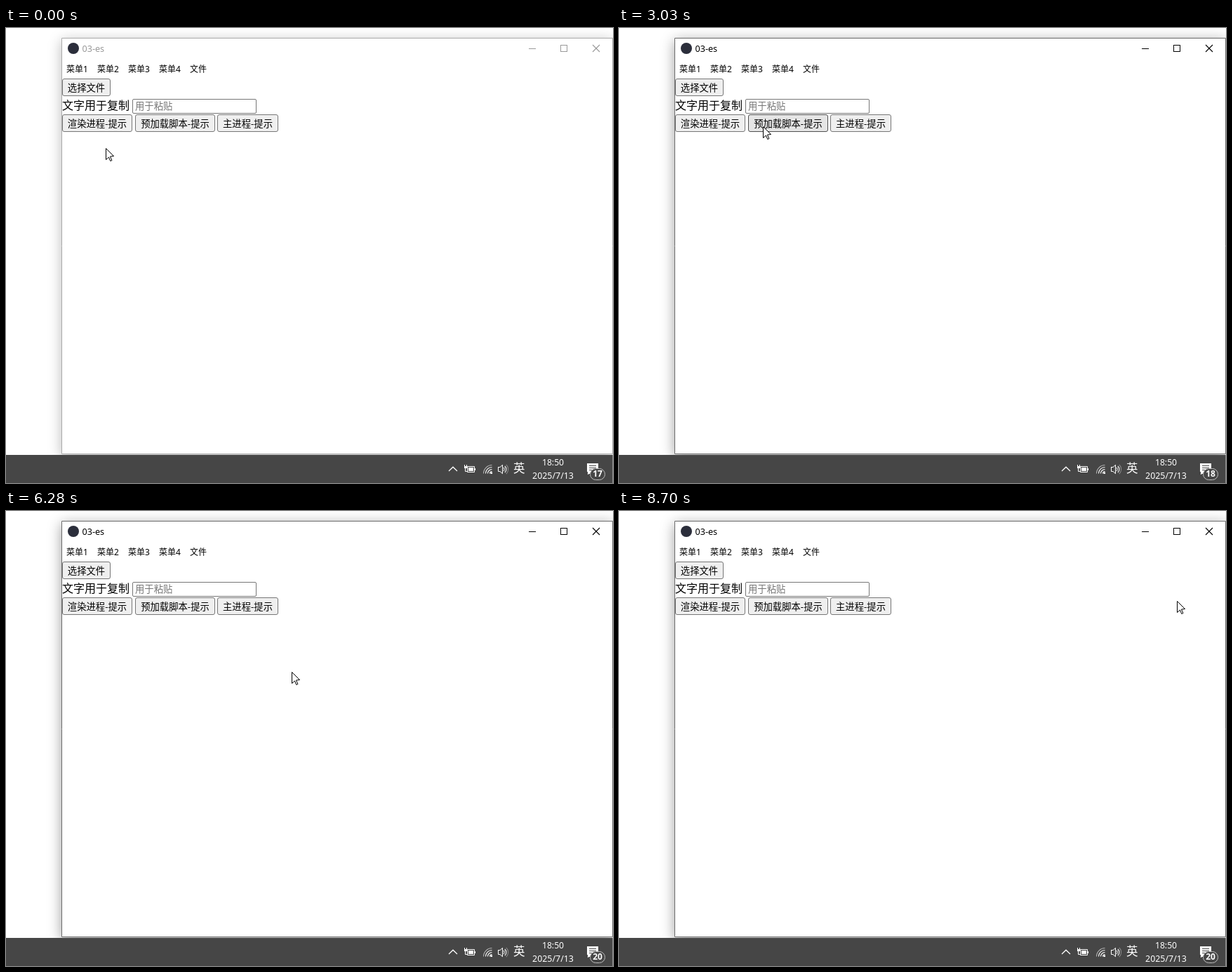
An HTML page with a canvas that plays this animation: 865x648 px, repeating every 8830 ms.

```html
<!DOCTYPE html>
<html lang="zh-CN">
<head>
<meta charset="utf-8">
<title>03-es</title>
<style>
html, body { margin: 0; width: 100%; height: 100%; overflow: hidden; background: #fff; }
canvas { display: block; width: 865px; height: 648px; }
</style>
</head>
<body>
<canvas id="stage" width="865" height="648"></canvas>
<script>
const ctx = document.getElementById('stage').getContext('2d');
const LOOP = 8830, STEP = 69.44, PHASE = 29;
const SLIDE_IN = 400, SLIDE_OUT = 210, REFOCUS = 260, FIRST_CLICK = 740;
const FONT = '"Noto Sans", "Noto Sans CJK SC", "Noto Sans CJK", sans-serif';

const buttons = [
  { x: 80, y: 72, w: 69, label: '选择文件' },
  { x: 80, y: 123, w: 100, label: '渲染进程-提示' },
  { x: 184, y: 123, w: 114, label: '预加载脚本-提示' },
  { x: 301, y: 123, w: 87, label: '主进程-提示' }
];
const toasts = [
  { start: 1115, end: 2400, title: '渲染进程', body: '渲染进程的消息内容' },
  { start: 3860, end: 5030, title: '预加载', body: '预加载脚本的具体消息内容' },
  { start: 6300, end: 7660, title: '主进程', body: '主进程的具体消息内容' }
];

// The pointer rests between moves; bend bows a move sideways.
const home = { x: 142, y: 171 }, closeIcon = { x: 819, y: 510 };
const moves = [
  { from: 460, to: 600, x: 143, y: 143 },
  { from: 930, to: 1350, x: 678, y: 602, bend: 0.2 },
  { from: 1350, to: 2190, ...closeIcon, bend: -0.3 },
  { from: 2400, to: 2800, x: 126, y: 155 },
  { from: 2800, to: 3030, x: 205, y: 140 },
  { from: 3030, to: 3160, x: 216, y: 140 },
  { from: 3600, to: 4260, x: 836, y: 505 },
  { from: 4820, to: 4960, ...closeIcon },
  { from: 5080, to: 5870, x: 339, y: 140 },
  { from: 6140, to: 6280, x: 407, y: 229 },
  { from: 6280, to: 6910, x: 762, y: 486, bend: 0.31 },
  { from: 6980, to: 7320, ...closeIcon, bend: 0.6 },
  { from: 7700, to: 8490, x: 797, y: 116 },
  { from: 8560, to: 8700, x: 795, y: 131 }
];

const clamp = v => Math.max(0, Math.min(1, v));
const snap = t => Math.max(0, Math.floor((t - PHASE) / STEP) * STEP + PHASE);
const inside = (p, x, y, w, h) => p.x >= x && p.x < x + w && p.y >= y && p.y < y + h;

function pointerAt(t) {
  let p = home;
  for (const m of moves) {
    if (t < m.from) break;
    const k = 1 - (1 - clamp((t - m.from) / (m.to - m.from))) ** 2;
    const dx = m.x - p.x, dy = m.y - p.y;
    const bow = 2 * k * (1 - k) * (m.bend || 0);
    p = { x: p.x + dx * k - dy * bow, y: p.y + dy * k + dx * bow };
  }
  return { x: Math.round(p.x), y: Math.round(p.y) };
}

function text(str, x, y, size, color, align = 'left', weight = 400) {
  ctx.font = `${weight} ${size}px ${FONT}`;
  ctx.textAlign = align;
  ctx.fillStyle = color;
  ctx.fillText(str, x, y);
}

function rect(x, y, w, h, color) {
  ctx.fillStyle = color;
  ctx.fillRect(x, y, w, h);
}

function box(x, y, w, h, r, fill, stroke) {
  ctx.beginPath();
  ctx.roundRect(x + 0.5, y + 0.5, w - 1, h - 1, r);
  ctx.fillStyle = fill;
  ctx.fill();
  ctx.lineWidth = 1;
  ctx.strokeStyle = stroke;
  ctx.stroke();
}

function line(color, width, ...pts) {
  ctx.beginPath();
  pts.forEach(([x, y]) => ctx.lineTo(x, y));
  ctx.strokeStyle = color;
  ctx.lineWidth = width;
  ctx.stroke();
}

function arc(x, y, r, from, to, color) {
  ctx.beginPath();
  ctx.arc(x, y, r, from, to);
  ctx.strokeStyle = color;
  ctx.lineWidth = 1.1;
  ctx.stroke();
}

function cross(x, y, r, color) {
  line(color, 1.1, [x - r, y - r], [x + r, y + r]);
  line(color, 1.1, [x + r, y - r], [x - r, y + r]);
}

function drawWindow(active, p) {
  ctx.save();
  ctx.shadowColor = `rgba(0,0,0,${active ? 0.38 : 0.27})`;
  ctx.shadowBlur = 18;
  ctx.shadowOffsetY = 4;
  rect(79, 14, 786, 593, '#fff');
  ctx.restore();
  box(79, 14, 786, 593, 0, '#fff', active ? '#6b6b6b' : '#aaa');

  ctx.beginPath();
  ctx.arc(96, 29, 8, 0, Math.PI * 2);
  ctx.fillStyle = '#2b2e3b';
  ctx.fill();
  const ink = active ? '#000' : '#999';
  text('03-es', 108.5, 34, 12.6, ink);
  line(ink, 1, [745, 29.5], [755, 29.5]);
  ctx.strokeRect(790.5, 24.5, 9, 9);
  cross(841, 29, 5, ink);

  ['菜单1', '菜单2', '菜单3', '菜单4', '文件'].forEach((s, i) => text(s, 86 + 44 * i, 63, 12, '#000'));

  for (const b of buttons) {
    const hot = inside(p, b.x, b.y, b.w, 25);
    box(b.x, b.y, b.w, 25, 2.5, hot ? '#e5e5e5' : '#efefef', hot ? '#4f4f4f' : '#767676');
    text(b.label, b.x + b.w / 2, b.y + 18, 13.333, '#000', 'center');
  }
  text('文字用于复制', 80, 116, 16, '#000');
  box(180, 101, 177, 21, 1.5, '#fff', '#767676');
  text('用于粘贴', 184, 116, 13.333, '#757575');
}

function drawToast(toast, t, p) {
  const rest = 1 - clamp((t - toast.start) / SLIDE_IN);
  const out = clamp((t - toast.end) / SLIDE_OUT);
  if (rest === 1 || out === 1) return;
  const x = 489 + Math.round(376 * (rest ** 3 + out ** 2));
  ctx.save();
  ctx.globalAlpha = 1 - out * 0.6;
  rect(x, 484, 364, 111, '#3b3b3b');
  text('electron.app.Electron', x + 40, 515, 12, '#fff');
  text(toast.title, x + 16, 550, 15, '#fff', 'left', 700);
  text(toast.body, x + 16, 570, 15, '#b0b0b0');
  if (inside(p, x, 484, 364, 111)) {
    for (let i = 0; i < 3; i++) rect(x + 308 + 5 * i, 509.5, 1.6, 1.6, '#b0b0b0');
  }
  cross(x + 336, 510, 4.7, inside(p, x + 328, 502, 16, 16) ? '#fff' : '#b4b4b4');
  ctx.restore();
}

function drawTaskbar(count) {
  const w = '#fff';
  rect(0, 608, 865, 40, '#464646');
  rect(864, 608, 1, 40, '#8c8c8c');
  line(w, 1.2, [631, 631], [637, 625.2], [643, 631]);

  // Battery with plug
  box(657, 624, 11, 9, 0, '#464646', w);
  rect(659, 626, 7, 5, w);
  rect(668, 627, 1, 3, w);
  rect(653, 624, 4, 3, w);
  for (const x of [653, 656]) rect(x, 622, 1, 2, w);
  line(w, 1, [654.5, 627], [654.5, 631.5], [657, 631.5]);

  // Wireless
  for (let i = 1; i < 5; i++) arc(692.5, 634.5, i * 3, Math.PI, Math.PI * 1.5, i < 4 ? w : '#b5b5b5');
  rect(690.5, 632.5, 2.5, 2.5, w);

  // Volume
  line(w, 1, [701.5, 625.5], [704, 625.5], [707.5, 622.3], [707.5, 634.7], [704, 631.5], [701.5, 631.5], [701.5, 625]);
  for (let i = 0; i < 3; i++) arc(706.5, 628.5, 3.5 + 2.8 * i, -0.8, 0.8, i < 2 ? w : '#8c8c8c');

  text('英', 723, 633, 16.5, w);
  text('18:50', 779.5, 623, 12.2, w, 'center');
  text('2025/7/13', 779.5, 642, 12.4, w, 'center');

  // Notifications
  rect(828, 620, 16, 12, w);
  for (let i = 0; i < 4; i++) rect(829, 632 + i, 7 - 2 * i, 1, w);
  for (let i = 0; i < 3; i++) rect(831, 623 + 3 * i, 10, 1, '#464646');
  box(832, 627, 22, 17, 8, '#464646', '#bdbdbd');
  text(String(count), 843, 639, 12, w, 'center', 700);
}

function drawPointer(p) {
  ctx.save();
  ctx.translate(p.x + 0.5, p.y + 0.5);
  ctx.beginPath();
  [[0, 0], [0, 16], [4, 12.5], [6.3, 18], [8.4, 17], [6, 11.5], [11, 11]].forEach(q => ctx.lineTo(...q));
  ctx.closePath();
  ctx.fillStyle = '#fff';
  ctx.fill();
  ctx.strokeStyle = '#000';
  ctx.lineWidth = 1;
  ctx.stroke();
  ctx.restore();
}

function draw(now) {
  const t = snap(now % LOOP);
  const p = pointerAt(t);
  const active = t >= FIRST_CLICK && !toasts.some(n => t >= n.end && t < n.end + REFOCUS);
  rect(0, 0, 865, 648, '#fff');
  drawWindow(active, p);
  drawTaskbar(17 + toasts.filter(n => t >= n.start - 40).length);
  toasts.forEach(n => drawToast(n, t, p));
  drawPointer(p);
}

const begin = performance.now();
function frame() {
  draw(performance.now() - begin);
  requestAnimationFrame(frame);
}
frame();
</script>
</body>
</html>
```
